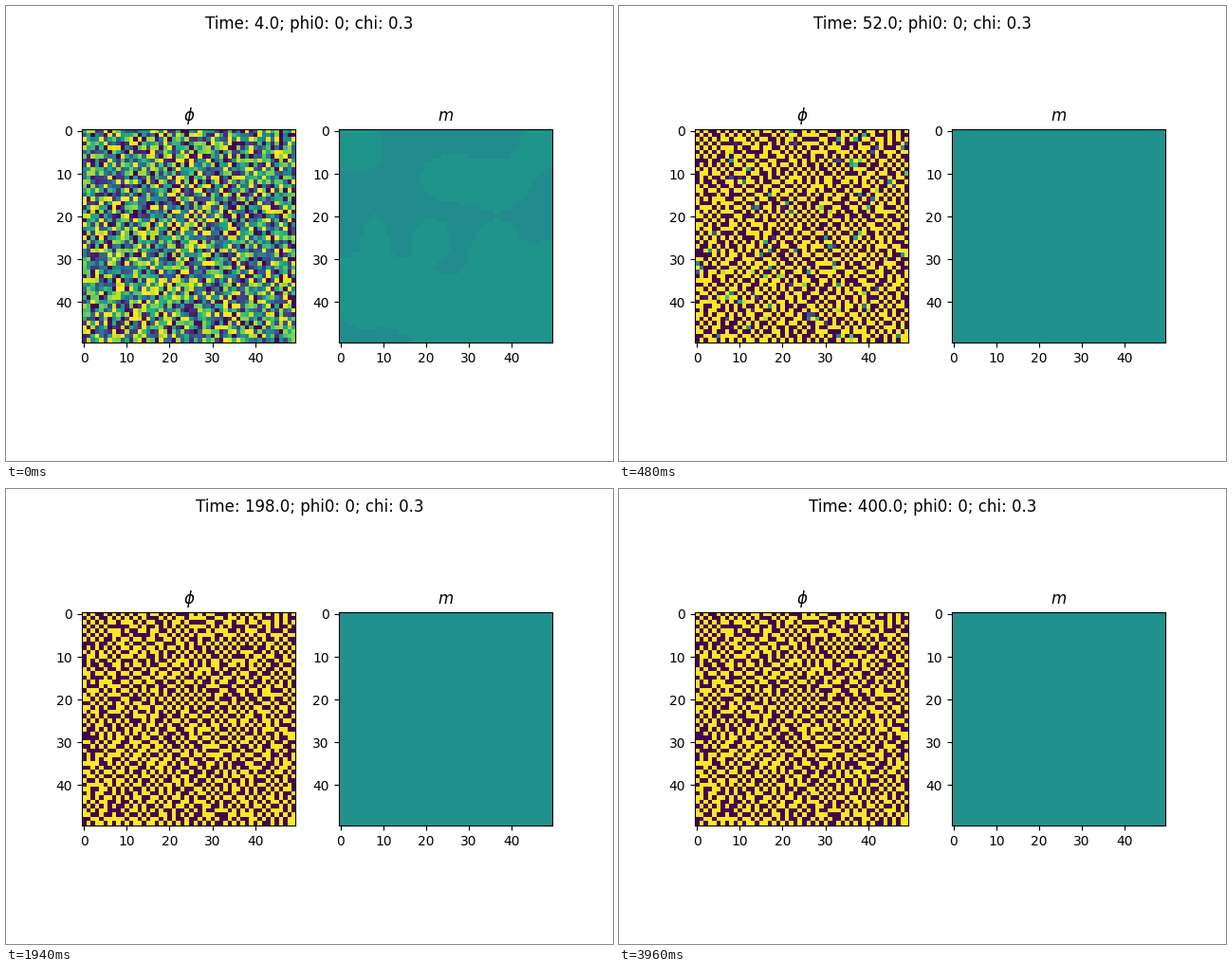
A matplotlib script that plays this animation: 640 by 480 pixels, repeating every 3.98 s.

```python
import matplotlib.pyplot as plt
import numpy as np
from matplotlib.animation import FuncAnimation

N = 50
FRAMES = 199
STEP = 2.0          # simulated time per frame
START = 4.0
FREEZE = 220.0      # all cells are settled from here on
GROWTH, COUPLING = 0.05, 0.02

rows, cols = np.mgrid[:N, :N]


def bump(cx, cy, rx, ry, wrap=False):
    dx, dy = cols - cx, rows - cy
    if wrap:
        dx = (dx + N / 2) % N - N / 2
        dy = (dy + N / 2) % N - N / 2
    return np.exp(-0.7 * ((dx / rx) ** 2 + (dy / ry) ** 2))


def neighbours(a):
    return sum(np.roll(a, s, axis) for s in (-1, 1) for axis in (0, 1))


def advance(phi, duration, dt=0.25):
    """Each cell grows to +-1 and is pushed away from its neighbours."""
    for _ in range(round(duration / dt)):
        phi = phi + dt * (GROWTH * phi - COUPLING * neighbours(phi))
        phi = np.clip(phi, -1, 1)
    return phi


def simulate():
    rng = np.random.default_rng(7)
    phi = rng.uniform(-1, 1, (N, N)) + 0.5 * bump(15, 37, 3, 4)
    phi = advance(np.clip(phi, -1, 1), START)
    states = [phi]
    for k in range(1, FRAMES):
        phi = advance(phi, STEP)
        if START + STEP * k >= FREEZE:
            phi = np.where(phi > 0, 1.0, -1.0)
        states.append(phi)
    return states


# Patches of the slow field: centre x, centre y, radius x, radius y
PATCHES = [(3, 4, 7, 6), (25, 11, 6, 5), (37, 12, 7, 5), (47, 3, 5, 5),
           (21, 25, 4, 4), (8, 24, 2.5, 4), (36.5, 29, 6, 7), (49, 31, 4, 5),
           (6, 36, 11, 7), (24, 43, 16, 7), (42, 46, 12, 7)]
patchy = sum(bump(*p) for p in PATCHES) - bump(10.5, 50, 3, 2.5) * 1.6 - 0.5
dip = 0.5 - bump(6, 14.8, 8.8, 6.3, wrap=True)


def slow_field(t):
    mix = np.clip((t - START) / 28, 0, 1)
    fade = max(0, t - 32) / 30
    shape = (1 - mix) * patchy + mix * dip + fade
    high = 0.035 * (1 - mix) ** 2
    low = -0.03 * (1 - mix) ** 2 - 0.006
    return np.where(shape > 0, high, low)


states = simulate()

fig, axes = plt.subplots(1, 2, figsize=(6.4, 4.8), dpi=100)
images = []
for ax, name in zip(axes, (r"$\phi$", "$m$")):
    images.append(ax.imshow(np.zeros((N, N)), cmap="viridis", vmin=-1, vmax=1,
                            interpolation="nearest"))
    ax.set_title(name)
    ax.set_xticks(range(0, N, 10))
    ax.set_yticks(range(0, N, 10))
heading = fig.suptitle("")


def update(k):
    t = START + STEP * k
    images[0].set_data(states[k])
    images[1].set_data(slow_field(t))
    heading.set_text(f"Time: {t:.1f}; phi0: 0; chi: 0.3")
    return [*images, heading]


anim = FuncAnimation(fig, update, frames=FRAMES, interval=20,
                     repeat=True, repeat_delay=0)
plt.show()
```
